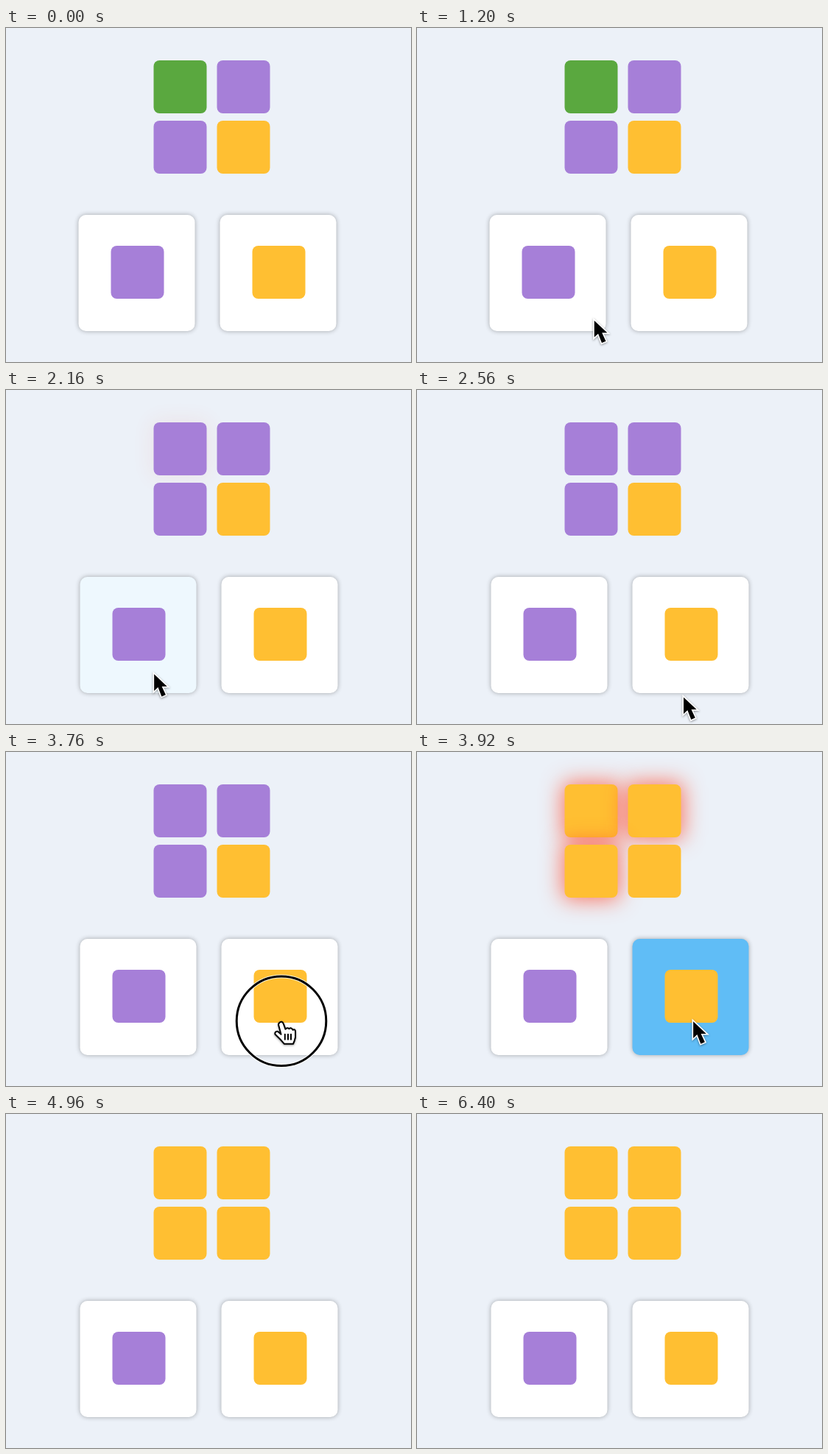
Write an HTML page that moves like this. It is 550 px wide and 454 px high and loops after 6480 ms.

```html
<!DOCTYPE html>
<html lang="en">
<head>
<meta charset="utf-8">
<title>Colour match</title>
<style>
  html, body { margin: 0; width: 100%; height: 100%; overflow: hidden; background: #ecf1f8; }
  #stage { position: relative; width: 550px; height: 454px; overflow: hidden; background: #ecf1f8; }
  .tile, .card { position: absolute; }
  #stage > div { transform: translateX(.5px); }
  .tile { width: 72px; height: 72px; border-radius: 8px; }
  .card { top: 254px; width: 158px; height: 158px; border-radius: 10px; box-shadow: 0 0 6px rgba(0, 0, 0, .32); }
  .card .tile { left: 44px; top: 42px; }
  svg { position: absolute; inset: 0; z-index: 1; }
  #arrow, #hand { filter: drop-shadow(0 1px 1.5px rgba(0, 0, 0, .4)); }
</style>
</head>
<body>
<div id="stage">
  <svg width="550" height="454">
    <g id="arrow">
      <path transform="scale(1.1)" d="M1.5 3.9V24.5L6.3 20L10.8 31.5L15.8 29.3L11 19H17.5Z"
        stroke="#fff" stroke-width="3" stroke-miterlimit="6" paint-order="stroke"/>
    </g>
    <g id="click">
      <circle r="60.8" fill="none" stroke="#fff" stroke-width="5" stroke-opacity=".8"/>
      <circle r="60.8" fill="none" stroke="#000" stroke-width="3"/>
      <g id="hand" stroke="#000" stroke-width="2" stroke-linejoin="round" stroke-linecap="round">
        <path fill="#fff" d="M-2.5 2Q1 -1 3 4L5.5 11Q8 8 10.5 10.5Q13.5 8 15.5 12Q19 10 19 15V22Q18 27 16 31H4Q-1 25 -8.5 18Q-9.5 14 -5 14L-.5 18L-4 5Q-4 3 -2.5 2Z"/>
        <path d="M4.8 18V25M9 18V25M13 18V25"/>
      </g>
    </g>
  </svg>
</div>
<script>
const LOOP = 6480, STEP = 80;
const GREEN = '#5aa83f', PURPLE = '#a67fd8', YELLOW = '#ffbf32', BLUE = '#60bdf6';
const FIRST = 1840, SECOND = 3920;
const ENTRY = [425, 455], LEFT_CARD = [199.5, 382], RIGHT_CARD = [373.5, 362];

const stage = document.getElementById('stage');
const arrow = document.getElementById('arrow');
const click = document.getElementById('click');

function box(parent, className, style) {
  const el = document.createElement('div');
  el.className = className;
  Object.assign(el.style, style);
  return parent.appendChild(el);
}

const tiles = [0, 1, 2, 3].map(i => box(stage, 'tile', {
  left: 200 + i % 2 * 86 + 'px',
  top: 44 + (i >> 1) * 82 + 'px'
}));
const cards = [PURPLE, YELLOW].map(color => {
  const card = box(stage, 'card', {});
  box(card, 'tile', { background: color });
  return card;
});

const progress = (t, from, to) => Math.min(1, Math.max(0, (t - from) / (to - from)));
const easeOut = u => 1 - (1 - u) ** 1.5;
const curve = (a, bend, b, s) =>
  a.map((v, i) => (1 - s) ** 2 * v + 2 * s * (1 - s) * bend[i] + s * s * b[i]);

function pointerAt(t) {
  if (t < 2160) return curve(ENTRY, [300, 410], LEFT_CARD, easeOut(progress(t, 720, 1440)));
  const [x, y] = curve(LEFT_CARD, [405, 462], RIGHT_CARD, easeOut(progress(t, 2160, 3040)));
  return [x, y + 22 * progress(t, 4400, 4800)];
}

// A faint hint one step before the state changes, then a full flash that decays.
function flash(age) {
  if (age < 0) return age >= -STEP ? .07 : 0;
  return (1 - progress(age, 0, 400)) ** 1.4;
}

function mix(from, to, k) {
  const channel = i => {
    const a = parseInt(from.slice(i, i + 2), 16), b = parseInt(to.slice(i, i + 2), 16);
    return Math.round(a + (b - a) * k);
  };
  return `rgb(${channel(1)}, ${channel(3)}, ${channel(5)})`;
}

const glow = k => k > 0 ? `0 0 29px 3px rgba(255, 70, 40, ${.7 * k})` : 'none';

function render(t) {
  const flashes = [FIRST, SECOND].map(at => flash(t - at));
  const changed = (at, k) => t >= at ? 1 : k;

  tiles.forEach((tile, i) => {
    const start = i === 0 ? GREEN : i === 3 ? YELLOW : PURPLE;
    const end = i === 3 ? YELLOW : PURPLE;
    tile.style.background = t < SECOND - STEP
      ? mix(start, end, changed(FIRST, flashes[0]))
      : mix(end, YELLOW, changed(SECOND, flashes[1]));
    tile.style.boxShadow = glow(i === 3 ? 0 : Math.max(i === 0 ? flashes[0] : 0, flashes[1]));
  });

  cards.forEach((card, i) => {
    card.style.left = 98 + i * 192 + (t >= FIRST ? 2 : 0) + 'px';
    card.style.background = mix('#ffffff', BLUE, flashes[i]);
  });

  const [x, y] = pointerAt(t);
  const pressed = [FIRST, SECOND].some(at => t >= at - 240 && t < at - 80);
  arrow.setAttribute('transform', `translate(${x} ${y})`);
  arrow.setAttribute('opacity', pressed || t < 800 ? 0 : 1 - progress(t, 4560, 4960));
  click.setAttribute('transform', `translate(${x + .5} ${y + 3.8})`);
  click.setAttribute('visibility', pressed ? 'visible' : 'hidden');
}

const begin = performance.now();
function tick() {
  const t = (performance.now() - begin) % LOOP;
  render(Math.floor(t / STEP) * STEP);
  requestAnimationFrame(tick);
}
render(0);
requestAnimationFrame(tick);
</script>
</body>
</html>
```
